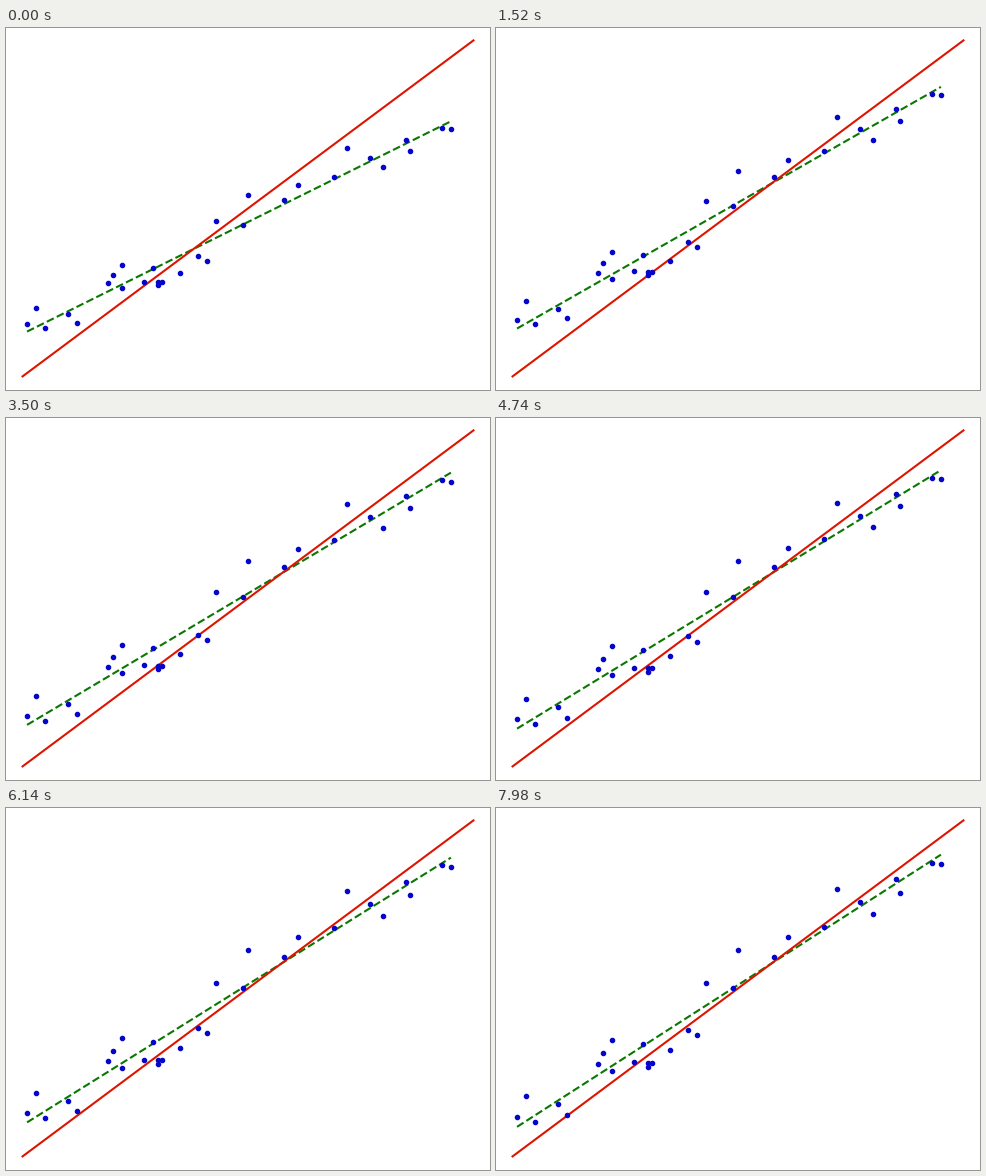
Write a matplotlib script that moves like this. It is 484 px wide and 362 px high and loops after 8 s.

```python
import math

import matplotlib.pyplot as plt
import numpy as np
from matplotlib.animation import FuncAnimation

W, H, DPI = 484, 362, 100
LOOP_MS, FRAME_MS = 8000, 20
STEP_MS = 63              # time between two gradient descent steps
RATE = 0.03
START = (0.0, 800.0)      # initial slope and intercept

years = np.array([
    1.1, 1.3, 1.5, 2.0, 2.2, 2.9, 3.0, 3.2, 3.2, 3.7,
    3.9, 4.0, 4.0, 4.1, 4.5, 4.9, 5.1, 5.3, 5.9, 6.0,
    6.8, 7.1, 7.9, 8.2, 8.7, 9.0, 9.5, 9.6, 10.3, 10.5])
salary = np.array([
    39343, 46205, 37731, 43525, 39891, 56642, 60150, 54445, 64445, 57189,
    63218, 55794, 56957, 57081, 61111, 67938, 66029, 83088, 81363, 93940,
    91738, 98273, 101302, 113812, 109431, 105582, 116969, 112635, 122391,
    121872])


def descend(steps):
    """Slope and intercept after each step of least-squares descent."""
    slope, intercept = START
    history = [START]
    for _ in range(steps):
        error = salary - (slope * years + intercept)
        slope += RATE * np.mean(error * years)
        intercept += RATE * np.mean(error)
        history.append((slope, intercept))
    return history


history = descend(LOOP_MS // STEP_MS + 3)
best_slope, best_intercept = np.polyfit(years, salary, 1)
span = np.array([1.0, 11.0])

fig = plt.figure(figsize=(W / DPI, H / DPI), dpi=DPI, facecolor="white")
# The axes reach slightly past the figure edges.
ax = fig.add_axes([-6 / W, -3.2 / H, 496 / W, 369.6 / H])
ax.axis("off")
ax.set_xlim(0.5, 11.5)

ax.plot(years, best_slope * years + best_intercept, "--", color="#0a7800",
        lw=1.5, zorder=2)
fit_line, = ax.plot(span, span, color="#dd1500", lw=1.5, zorder=3)
ax.plot(years, salary, ".", color="#0505cc", ms=6, zorder=4)


def update(frame):
    step = 1 + math.ceil(frame * FRAME_MS / STEP_MS)
    slope, intercept = history[step]
    low, high = slope * span + intercept
    fit_line.set_ydata([low, high])
    # The view follows the fitted line with a 5% margin.
    margin = 0.05 * (high - low)
    ax.set_ylim(low - margin, high + margin)
    return fit_line,


anim = FuncAnimation(fig, update, frames=LOOP_MS // FRAME_MS,
                     interval=FRAME_MS, repeat=True, repeat_delay=0,
                     blit=False)
plt.show()
```
